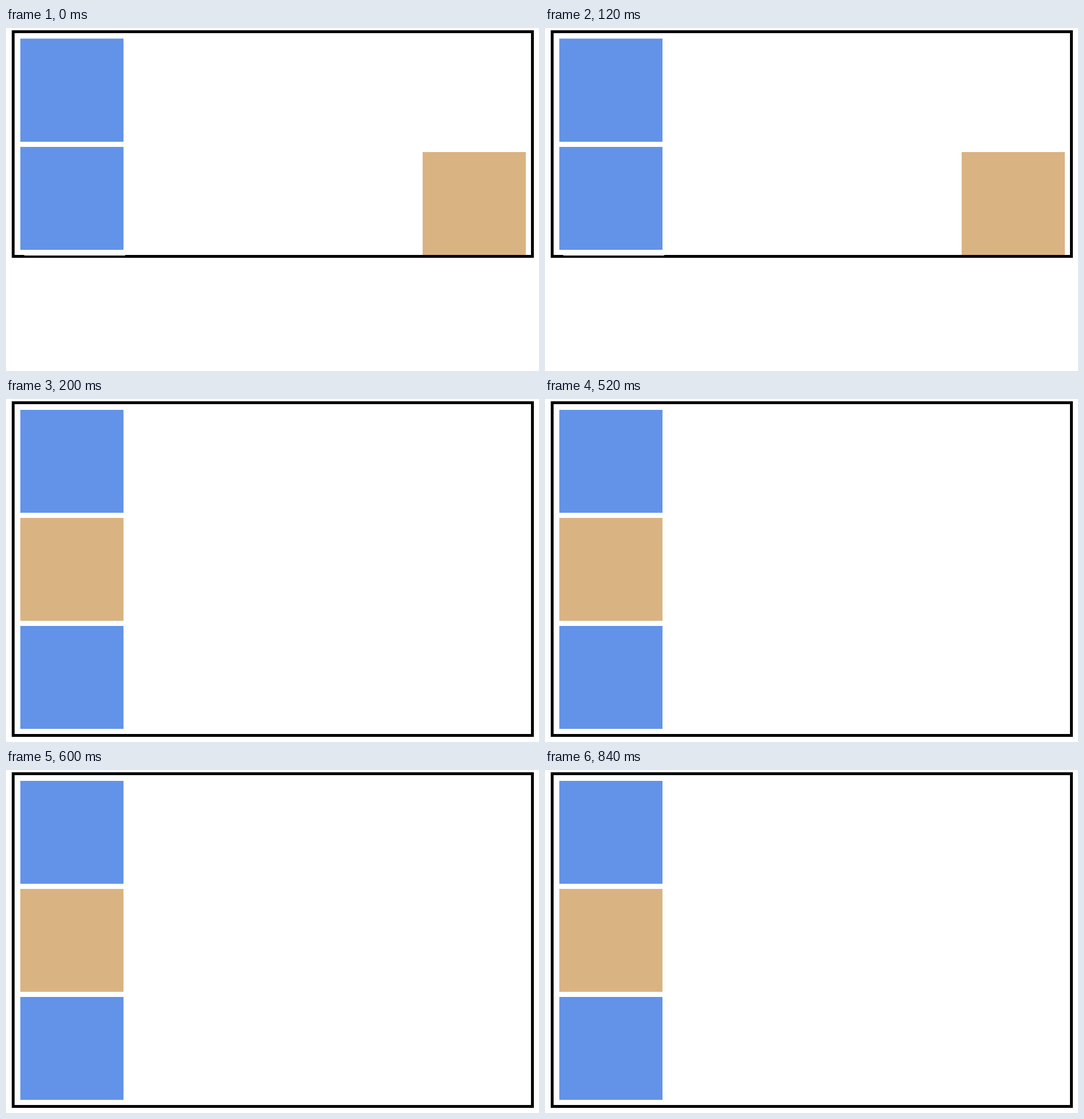
An HTML page with a canvas that plays this animation: 930 px wide and 600 px high, repeating every 1000 ms.

```html
<!DOCTYPE html>
<html lang="en">
<head>
<meta charset="utf-8">
<title>Boxes in a frame</title>
<style>
  html, body { margin: 0; width: 100%; height: 100%; overflow: hidden; background: #fff; }
  canvas { display: block; }
</style>
</head>
<body>
<canvas id="stage" width="930" height="600"></canvas>
<script>
const ctx = document.getElementById('stage').getContext('2d');
const BLUE = '#6393e8', TAN = '#dab383';
const LOOP = 1000, SWITCH = 200, SIZE = 180;

function rect(color, x, y, w = SIZE, h = SIZE) {
  ctx.fillStyle = color;
  ctx.fillRect(x, y, w, h);
}

function border(bottom) {
  ctx.strokeStyle = '#000';
  ctx.lineWidth = 5;
  ctx.strokeRect(12.5, 6.5, 906, bottom - 9);
}

function draw(time) {
  rect('#fff', 0, 0, 930, 600);
  if (time % LOOP < SWITCH) {
    // Tan box out of the flow, at the bottom right
    border(402);
    rect('#fff', 32, 397, 176, 1);
    rect(BLUE, 25, 18.5, SIZE, 180.5);
    rect(BLUE, 25, 208);
    rect(TAN, 727, 217);
  } else {
    // All boxes stacked in order
    border(591);
    [BLUE, TAN, BLUE].forEach((color, i) => rect(color, 25, 19 + i * 189));
  }
}

function tick() {
  draw(performance.now());
  requestAnimationFrame(tick);
}
tick();
</script>
</body>
</html>
```
